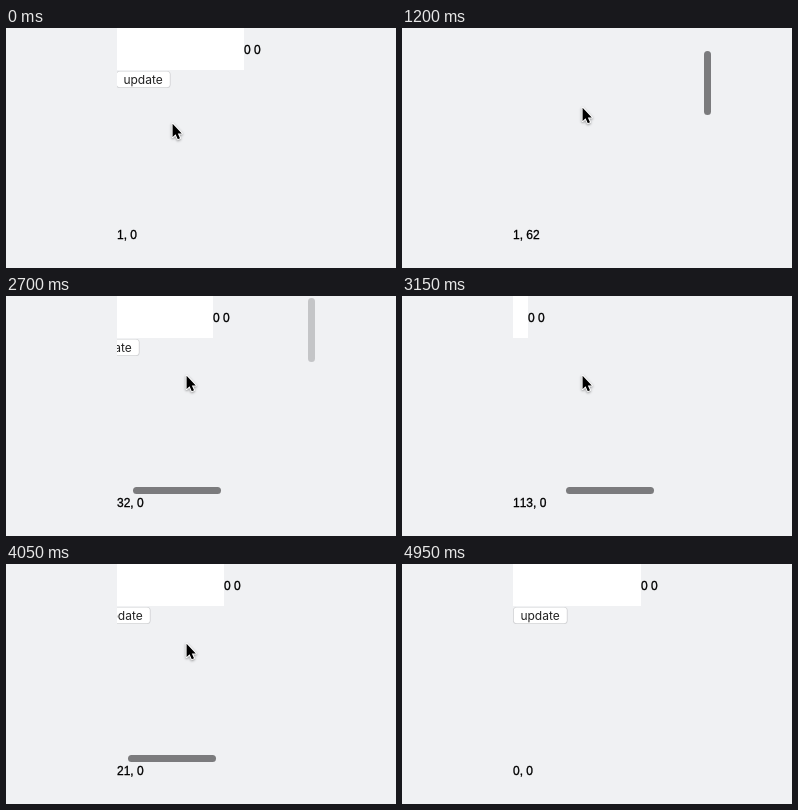
Animation, 390 px wide and 240 px high, one loop 5.25 s. Source, as an HTML page with a canvas:

```html
<!DOCTYPE html>
<html lang="en">
<head>
<meta charset="utf-8">
<title>Scroll offset</title>
<style>
  html, body { margin: 0; width: 100%; height: 100%; overflow: hidden; background: #f0f1f3; }
  canvas { display: block; width: 390px; height: 240px; }
</style>
</head>
<body>
<canvas id="stage" width="390" height="240"></canvas>
<script>
const ctx = document.getElementById('stage').getContext('2d');
const LOOP = 5250, STEP = 150;
const BACK = '#f0f1f3', THUMB = '#7b7b7d';
const LABEL_FONT = '12px "Liberation Sans", Arial, sans-serif';
const BUTTON_FONT = '12px Inter, sans-serif';
const view = { x: 111, y: 0, w: 200, h: 200 };

// Scroll offsets, one per step, starting at the given time.
const vertical = { start: 600, offsets: [5, 17, 33, 50, 62, 66, 60, 46, 29, 11, 0] };
const horizontal = { start: 2700, offsets: [32, 62, 90, 113, 124, 122, 106, 80, 48, 21, 9, 4, 1, 0] };

function offsetAt(track, time, before) {
  const i = Math.floor((time - track.start) / STEP);
  if (i < 0) return before;
  return track.offsets[Math.min(i, track.offsets.length - 1)];
}

// Thumbs stay solid while scrolling, show one faded step, then vanish.
function thumbAlpha(time, start, fade) {
  if (time < start || time >= fade + STEP) return 0;
  return time < fade ? 1 : 0.37;
}

function roundRect(x, y, w, h, r, color) {
  ctx.beginPath();
  ctx.roundRect(x, y, w, h, r);
  ctx.fillStyle = color;
  ctx.fill();
}

// The thin outline gives labels the heavier weight of smoothed type.
function drawLabel(str, x, y) {
  ctx.font = LABEL_FONT;
  ctx.fontKerning = 'none';
  ctx.fillStyle = ctx.strokeStyle = '#000';
  ctx.lineWidth = 0.3;
  ctx.fillText(str, x, y);
  ctx.strokeText(str, x, y);
}

function drawButton(x, y) {
  roundRect(x, y, 54.6, 17, 3.5, '#d0d1d3');
  roundRect(x + 0.8, y + 0.6, 53, 15.6, 3, '#fff');
  ctx.font = BUTTON_FONT;
  ctx.fillStyle = '#222';
  ctx.fillText('update', x + 7.4, y + 13);
}

function drawContent(sx, sy) {
  ctx.save();
  ctx.beginPath();
  ctx.rect(view.x, view.y, view.w, view.h);
  ctx.clip();
  ctx.translate(view.x - sx, view.y - sy);
  ctx.fillStyle = '#fff';
  ctx.fillRect(0, 0, 128, 42);
  drawLabel('0 0', 128, 25.5);
  drawButton(0, 43);
  ctx.restore();
}

function drawThumb(x, y, w, h, alpha) {
  if (!alpha) return;
  ctx.globalAlpha = alpha;
  roundRect(Math.floor(x), Math.floor(y), w, h, 3.5, THUMB);
  ctx.globalAlpha = 1;
}

function drawCursor(x, y) {
  const arrow = new Path2D('M0 0 V13.2 L3 10.4 L5.2 15.4 L7.4 14.4 L5.2 9.6 H9.2 Z');
  ctx.save();
  ctx.translate(x, y);
  ctx.lineJoin = 'round';
  ctx.lineWidth = 2;
  ctx.strokeStyle = '#fff';
  ctx.shadowColor = 'rgba(0,0,0,0.4)';
  ctx.shadowBlur = 2.5;
  ctx.shadowOffsetY = 1;
  ctx.stroke(arrow);
  ctx.shadowColor = 'transparent';
  ctx.fillStyle = '#000';
  ctx.fill(arrow);
  ctx.restore();
}

function draw(time) {
  const sx = offsetAt(horizontal, time, 1);
  const sy = offsetAt(vertical, time, 0);
  ctx.fillStyle = BACK;
  ctx.fillRect(0, 0, 390, 240);
  drawContent(sx, sy);
  drawThumb(302, 2.3 + sy * 0.335, 7, 64, thumbAlpha(time, 600, 2700));
  drawThumb(112.7 + sx * 0.457, 191, 88, 7, thumbAlpha(time, 2700, 4800));
  drawLabel(`${sx}, ${sy}`, view.x, 211);
  if (time < STEP) drawCursor(166.6, 95.8);
  else if (time < 4650) drawCursor(180.6, 79.8);
}

function tick() {
  draw(performance.now() % LOOP);
  requestAnimationFrame(tick);
}
tick();
</script>
</body>
</html>
```
